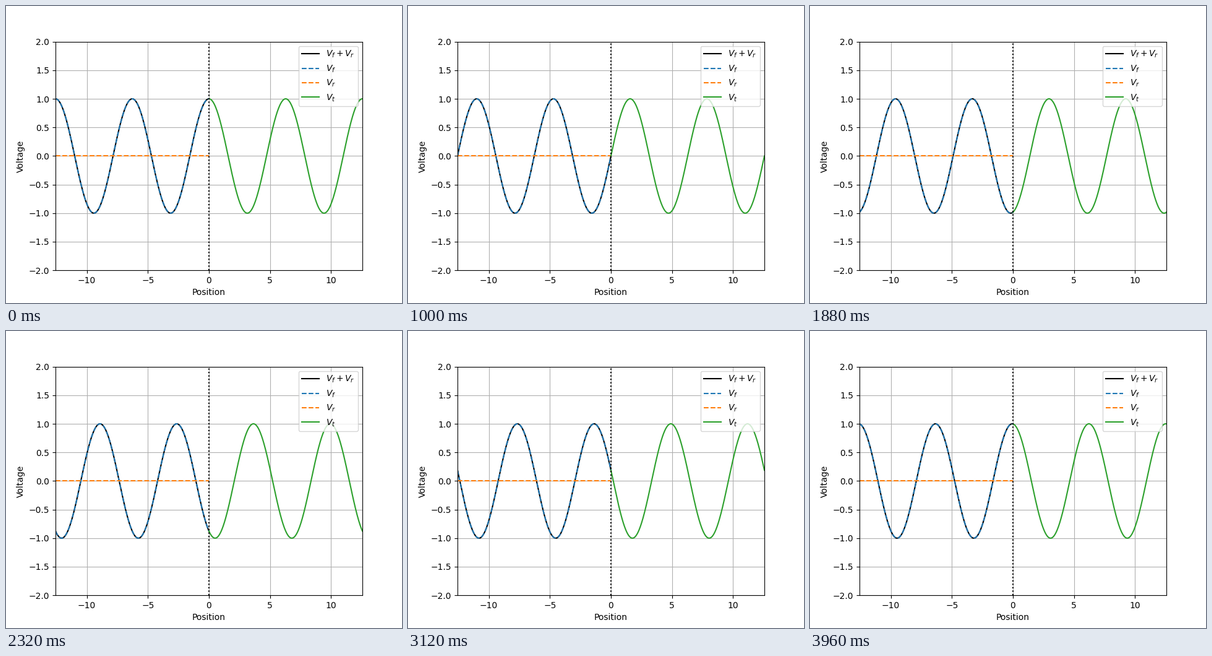
Write a matplotlib script that moves like this. It is 640 by 480 pixels and loops after 4000 ms.

```python
import numpy as np
import matplotlib.pyplot as plt
from matplotlib.animation import FuncAnimation

FRAMES = 100
SPAN = 4 * np.pi

left = np.linspace(-SPAN, 0, 500)
right = np.linspace(0, SPAN, 500)
reflection = 0.0
transmission = 1 + reflection

fig, ax = plt.subplots(figsize=(6.4, 4.8), dpi=100)
total, = ax.plot([], [], color="black", label="$V_f + V_r$")
forward, = ax.plot([], [], "--", color="C0", label="$V_f$")
reflected, = ax.plot([], [], "--", color="C1", label="$V_r$")
transmitted, = ax.plot([], [], color="C2", label="$V_t$")
ax.axvline(0, color="black", linestyle=":")

ax.set_xlim(-SPAN, SPAN)
ax.set_ylim(-2, 2)
ax.set_xlabel("Position")
ax.set_ylabel("Voltage")
ax.grid(True)
ax.legend(loc="upper right")


def update(i):
    phase = 2 * np.pi * i / FRAMES
    vf = np.cos(phase - left)
    vr = reflection * np.cos(phase + left)
    total.set_data(left, vf + vr)
    forward.set_data(left, vf)
    reflected.set_data(left, vr)
    transmitted.set_data(right, transmission * np.cos(phase - right))
    return total, forward, reflected, transmitted


anim = FuncAnimation(fig, update, frames=FRAMES, interval=40,
                     repeat=True, repeat_delay=0)
plt.show()
```
